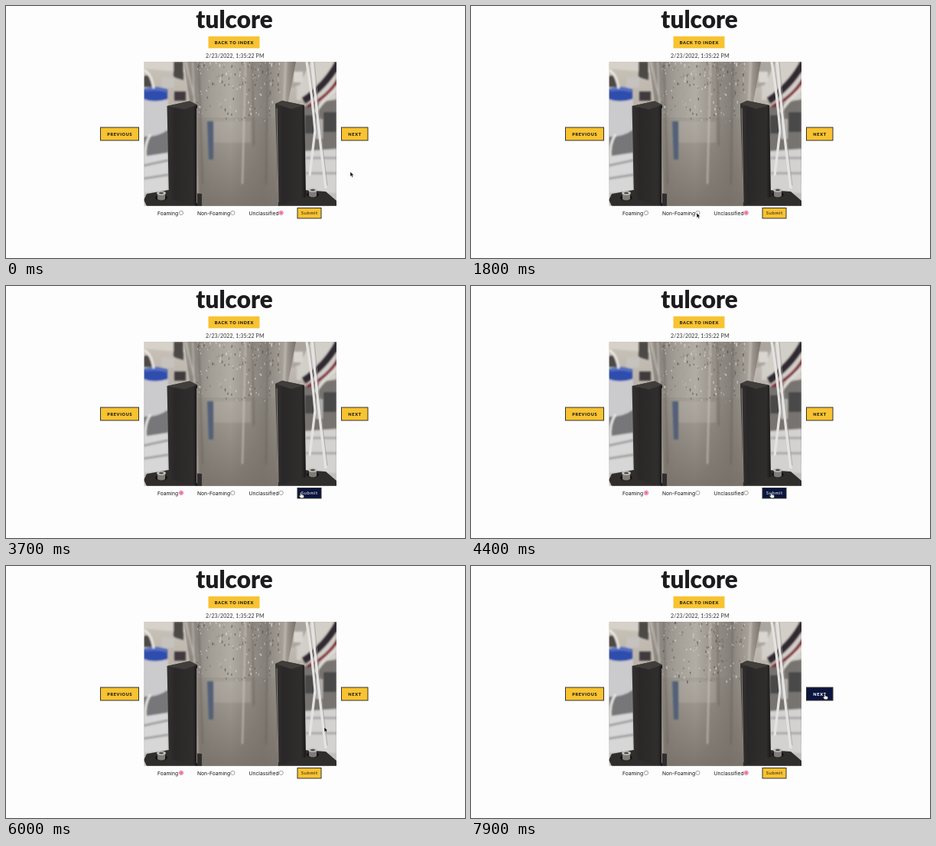
These frames come from a looping animation (600x330 px, 8000 ms). An HTML page:

```html
<!DOCTYPE html>
<html lang="en">
<head>
<meta charset="utf-8">
<title>Image classifier</title>
<style>
html, body { margin: 0; width: 100%; height: 100%; overflow: hidden; background: #fdfdfd; }
svg { display: block; width: 100vw; height: 100vh; }
text { font-family: Lato, sans-serif; fill: #1c1c1e; }
.title { font-size: 31.5px; font-weight: 900; text-anchor: middle; }
.date { font-size: 7px; letter-spacing: .1px; fill: #333; }
.label { font-family: Inter, sans-serif; font-size: 6.7px; fill: #111; }
.btn rect { fill: #f8c331; stroke: #34322c; }
.btn text { font-size: 5.5px; font-weight: 900; letter-spacing: .7px; text-anchor: middle; }
.btn.hover rect { fill: #0b1540; }
.btn.hover text { fill: #f4f4f6; }
.btn.plain rect { stroke: none; }
#submit text { font-size: 6.2px; font-weight: 400; letter-spacing: .5px; }
.radio circle:first-child { fill: #fff; stroke: #777; stroke-width: .7; }
.radio circle:last-child { fill: #e84a8c; display: none; }
.radio.on circle:first-child { fill: #fbd3e3; stroke: #e5689b; stroke-width: .9; }
.radio.on circle:last-child { display: inline; }
</style>
</head>
<body>
<svg viewBox="0 0 600 330">
  <defs>
    <linearGradient id="wall" x2="0" y2="1">
      <stop offset="0" stop-color="#c9c3b9"/><stop offset=".3" stop-color="#b9b2aa"/>
      <stop offset=".6" stop-color="#989490"/><stop offset="1" stop-color="#c9c6c4"/>
    </linearGradient>
    <linearGradient id="glass">
      <stop offset="0" stop-color="#aaa49c"/><stop offset=".08" stop-color="#87827b"/>
      <stop offset=".25" stop-color="#a39e96"/><stop offset=".42" stop-color="#b1aca4"/>
      <stop offset=".56" stop-color="#99938b"/><stop offset=".72" stop-color="#86817a"/>
      <stop offset=".9" stop-color="#a8a29a"/><stop offset="1" stop-color="#77716a"/>
    </linearGradient>
    <linearGradient id="liquid" x2="0" y2="1">
      <stop offset="0" stop-color="#746e66" stop-opacity=".15"/><stop offset="1" stop-color="#777068" stop-opacity=".9"/>
    </linearGradient>
    <linearGradient id="clamp">
      <stop offset="0" stop-color="#353231"/><stop offset=".25" stop-color="#292727"/>
      <stop offset=".85" stop-color="#302e2d"/><stop offset="1" stop-color="#181717"/>
    </linearGradient>
    <filter id="soft" x="-5%" y="-5%" width="110%" height="110%"><feGaussianBlur stdDeviation=".8"/></filter>
    <clipPath id="frame"><rect x="180.5" y="73" width="251.5" height="188.7"/></clipPath>
  </defs>
  <rect width="600" height="330" fill="#fdfdfd"/>
  <text class="title" x="298.5" y="28.7">tulcore</text>
  <text class="date" x="261" y="68.4">2/23/2022, 1:35:22 PM</text>

  <g clip-path="url(#frame)">
    <rect x="180" y="73" width="252" height="189" fill="url(#wall)"/>
    <g filter="url(#soft)">
      <!-- bench on the left -->
      <path d="M180 73h56v14l-56-5z" fill="#d7d2c9"/>
      <path d="M180 92l8-2 6 16h-14zM219 73h13v24l-13-4z" fill="#4e4946"/>
      <path d="M180 158h32v38h-32z" fill="#77777a"/>
      <path d="M180 121q16 5 32 1v40q-14 10-32 9z" fill="#cbcacd"/>
      <path d="M180 109q14-6 31 0v13q-17 5-31 0z" fill="#2d4dad"/>
      <path d="M182 108q12-4 28 1v4q-14-4-28-1z" fill="#5670c0"/>
      <path d="M220 112h15v12h-15z" fill="#3f3b3d"/>
      <path d="M203 93h17v14h-17z" fill="#c6c2bd"/>
      <path d="M180 197l32-5v50l-32 3z" fill="#d8d7d8"/>
      <path d="M180 209l32-7M180 226l32-5" stroke="#a1a0a2" stroke-width="3"/>
      <path d="M180 84q10 4 13 24M189 168q-8 12-7 29" fill="none" stroke="#ece9e4" stroke-width="3"/>
      <!-- bench on the right -->
      <path d="M380 73h52v50h-52z" fill="#d2cec8"/>
      <path d="M366 73h32l-14 30-18 7z" fill="#aaa59e"/>
      <path d="M376 86h12v14h-12z" fill="#d9d6d0"/>
      <path d="M388 132l44-10v72h-44z" fill="#77736f"/>
      <path d="M391 143h13v24h-13zM415 139h17v26h-17z" fill="#4a4848"/>
      <path d="M405 148h9v26h-9z" fill="#b6b3b0"/>
      <path d="M391 190l41-3v58h-41z" fill="#d4d2d1"/>
      <path d="M392 199h40M392 219h40" stroke="#aaa8a7" stroke-width="3"/>
      <path d="M434 74q-14 28-45 50" fill="none" stroke="#312c30" stroke-width="9"/>
      <path d="M434 96q-12 22-40 36" fill="none" stroke="#822f3e" stroke-width="4"/>
      <path d="M434 107q-16 12-30 32" fill="none" stroke="#dedbd6" stroke-width="4"/>
    </g>
    <path d="M232 73h147l-10 52-12 137H249l-9-137z" fill="url(#glass)"/>
    <path d="M249 146h109l-2 116H250z" fill="url(#liquid)"/>
    <g filter="url(#soft)">
      <path d="M272 151h48v28h-48z" fill="#c0bbb4" opacity=".3"/>
      <path d="M263 151h8v50h-6z" fill="#536078"/>
      <path d="M235 73l12 52M244 73l7 188M313 73l-4 160M366 73l-9 170" fill="none" stroke="#d5d0c8" stroke-width="2" opacity=".65"/>
      <path d="M252 73l5 160M322 73l2 110M342 73l-2 160" fill="none" stroke="#5f5952" stroke-width="2" opacity=".45"/>
    </g>
    <g id="drops"></g>
    <!-- base and clamps -->
    <path d="M184 246l28-5 44 5v16h-72l-4-8zM356 247l34-6 28 2 14 12v7h-76z" fill="#302d2d"/>
    <path d="M210.5 131L240 124.5l10 5V262l-37-10z" fill="url(#clamp)"/>
    <path d="M210.5 131L240 124.5l10 5-17 6z" fill="#403d3b"/>
    <path d="M352 128l9-4 29 6 2 120-36 12z" fill="url(#clamp)"/>
    <path d="M352 128l9-4 29 6-17 5z" fill="#403d3b"/>
    <path d="M249.5 134v124M354 134l2 123" stroke="#a19b94" stroke-width=".8"/>
    <g id="bolts"></g>
    <path d="M393 73q7 42 11 90l-7 59M400 73q5 54 12 116l6 50" fill="none" stroke="#e5e3e1" stroke-width="3.3"/>
    <path d="M396 73q7 46 10 92M403 73q5 54 11 112l6 50" fill="none" stroke="#a09e9d" stroke-width=".7"/>
  </g>

  <g id="ui"></g>
  <g id="arrow">
    <path d="M0 0v6.4l1.5-1.3 1.1 2.5 1.2-.5-1.1-2.4 2-.1z" fill="#080808" stroke="#fff" stroke-width=".5"/>
  </g>
  <g id="hand">
    <path d="M-.8 0q.8-.9 1.5 0v2.1l2.8.8q.8.3.6 1.3l-.6 2.6H-.2l-2.3-2.9q-.1-1 1-.6l.7.6z" fill="#fff" stroke="#111" stroke-width=".5"/>
  </g>
</svg>
<script>
const $ = id => document.getElementById(id);
const LOOP = 8000, STEP = 100, CLICK_FOAMING = 2600, NEXT_PAGE = 7600;

const buttons = [
  { id: "back", text: "BACK TO INDEX", x: 264.5, y: 39.7, w: 67, h: 15.6, plain: true },
  { id: "previous", text: "PREVIOUS", x: 123.5, y: 159, w: 50, h: 17 },
  { id: "next", text: "NEXT", x: 438.5, y: 159, w: 34.5, h: 17 },
  { id: "submit", text: "Submit", x: 381, y: 264.5, w: 31, h: 13.5 }
];
const options = [
  { id: "foaming", text: "Foaming", x: 198, dot: 229 },
  { id: "clear", text: "Non-Foaming", x: 250, dot: 296.4 },
  { id: "unclassified", text: "Unclassified", x: 317.6, dot: 359.7 }
];

$("ui").innerHTML = buttons.map(b => `<g id="${b.id}" class="btn">
  <rect x="${b.x}" y="${b.y}" width="${b.w}" height="${b.h}"/>
  <text x="${b.x + b.w / 2 + .3}" y="${b.y + b.h / 2 + 2}">${b.text}</text></g>`).join("") +
  options.map(o => `<text class="label" x="${o.x}" y="273.5">${o.text}</text>
  <g id="${o.id}" class="radio"><circle cx="${o.dot}" cy="270.9" r="2.6"/>
  <circle cx="${o.dot}" cy="270.9" r="1.4"/></g>`).join("");
$("back").classList.add("plain");

$("bolts").innerHTML = [[203, 245], [401, 241]].map(([x, y]) =>
  `<ellipse cx="${x}" cy="${y + 6}" rx="8" ry="4" fill="#171616"/>
   <path d="M${x - 5} ${y}v8q5 3 10 0v-8z" fill="#807c78"/>
   <ellipse cx="${x}" cy="${y}" rx="6" ry="2.8" fill="#c2beb9"/>
   <ellipse cx="${x}" cy="${y}" rx="3" ry="1.3" fill="#4b4947"/>`).join("");

function drawDrops(seed) {
  const rand = () => (seed = seed * 16807 % 2147483647) / 2147483647;
  let out = "";
  for (let i = 0; i < 190; i++) {
    const x = 250 + rand() * 108, y = 74 + rand() ** 1.5 * 78;
    const r = .35 + rand() * .65, light = rand() < .5;
    out += `<ellipse cx="${x}" cy="${y}" rx="${r}" ry="${r * (1 + rand() * 1.6)}"
      fill="${light ? "#dcd8d0" : "#5c564f"}" opacity="${.35 + rand() * .4}"/>`;
  }
  $("drops").innerHTML = out;
}

// Pointer path: time, x, y
const path = [
  [0, 450, 217], [200, 450, 217], [1000, 365, 252], [1500, 295, 271],
  [2000, 295, 271], [2450, 228, 270.5], [3000, 228, 270.5], [3800, 392.5, 271],
  [5400, 392.5, 271], [6000, 416, 211], [6400, 462.5, 168], [8000, 462.5, 168]
];
const ease = u => u * u * (3 - 2 * u);

function pointerAt(t) {
  const i = path.findIndex(p => p[0] > t);
  const [t0, x0, y0] = path[i - 1], [t1, x1, y1] = path[i];
  const k = ease((t - t0) / (t1 - t0));
  return [x0 + (x1 - x0) * k, y0 + (y1 - y0) * k];
}

let page = -1;
function render(time) {
  const t = Math.floor(time % LOOP / STEP) * STEP;
  const [x, y] = pointerAt(t);
  let over = false;
  for (const b of buttons) {
    const hit = x > b.x && x < b.x + b.w && y > b.y && y < b.y + b.h;
    $(b.id).classList.toggle("hover", hit);
    over = over || hit;
  }
  const chosen = t >= CLICK_FOAMING && t < NEXT_PAGE ? "foaming" : "unclassified";
  for (const o of options) $(o.id).classList.toggle("on", o.id === chosen);
  for (const id of ["arrow", "hand"]) {
    $(id).setAttribute("transform", `translate(${x} ${y})`);
    $(id).style.display = (id === "hand") === over ? "" : "none";
  }
  const now = t >= NEXT_PAGE ? 1 : 0;
  if (now !== page) drawDrops(now ? 90817 : 4271);
  page = now;
}

const start = performance.now();
function tick() {
  render(performance.now() - start);
  requestAnimationFrame(tick);
}
tick();
</script>
</body>
</html>
```
